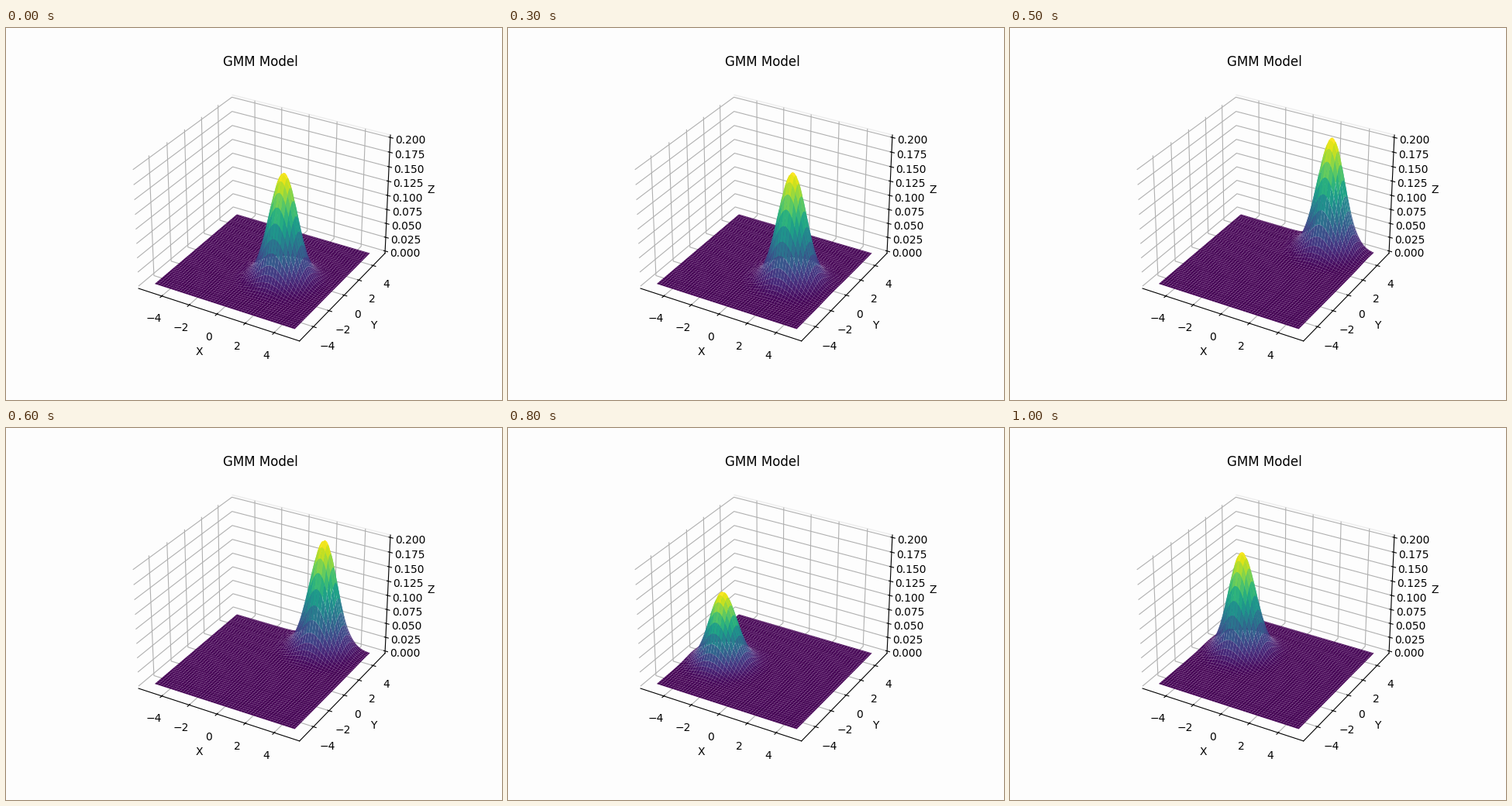
Animation, 640 px wide and 480 px high, one loop 1.1 s. Source, as a matplotlib script:

```python
import numpy as np
import matplotlib.pyplot as plt
from matplotlib.animation import FuncAnimation

STEPS, INTERVAL = 11, 100
PAPER = "#fdfdfd"
MARGIN = 1 / 48
SIGMA = 0.89

# Each drift: first step, last step, then (x, y, height) of the peak at both ends
DRIFTS = [
    (0, 4, (1.62, -0.45, 0.183), (2.46, -0.41, 0.189)),
    (5, 7, (2.26, 4.04, 0.196), (1.40, 3.74, 0.178)),
    (8, 10, (-2.70, -0.74, 0.125), (-2.46, 0.98, 0.175)),
]

plt.rcParams["font.family"] = "DejaVu Sans"
fig = plt.figure(figsize=(6.4, 4.8), dpi=100, facecolor=PAPER)
ax = fig.add_subplot(projection="3d", facecolor=PAPER)
ax.set_title("GMM Model")
ax.set(xlabel="X", ylabel="Y", zlabel="Z")
ax.set_xlim(-5.5, 5.5, view_margin=MARGIN)
ax.set_ylim(-5.5, 5.5, view_margin=MARGIN)
ax.set_zlim(0, 0.2, view_margin=MARGIN)
for axis in (ax.xaxis, ax.yaxis, ax.zaxis):
    axis.set_pane_color(PAPER, 1)
ax.yaxis.pane.set_edgecolor("0.93")

X, Y = np.meshgrid(np.linspace(-5, 5, 100), np.linspace(-5, 5, 100))
surface = None


def peak(step):
    """Ease in from the start to the end of the current drift."""
    first, last, start, end = next(d for d in DRIFTS if step <= d[1])
    t = ((step - first) / (last - first)) ** 2
    return (1 - t) * np.array(start) + t * np.array(end)


def bell(x, y, height):
    return height * np.exp(-((X - x) ** 2 + (Y - y) ** 2) / (2 * SIGMA ** 2))


def update(step):
    global surface
    if surface is not None:
        surface.remove()
    surface = ax.plot_surface(X, Y, bell(*peak(step)), cmap="viridis")
    return [surface]


anim = FuncAnimation(fig, update, frames=STEPS, interval=INTERVAL,
                     repeat=True, repeat_delay=0, blit=False)
plt.show()
```
